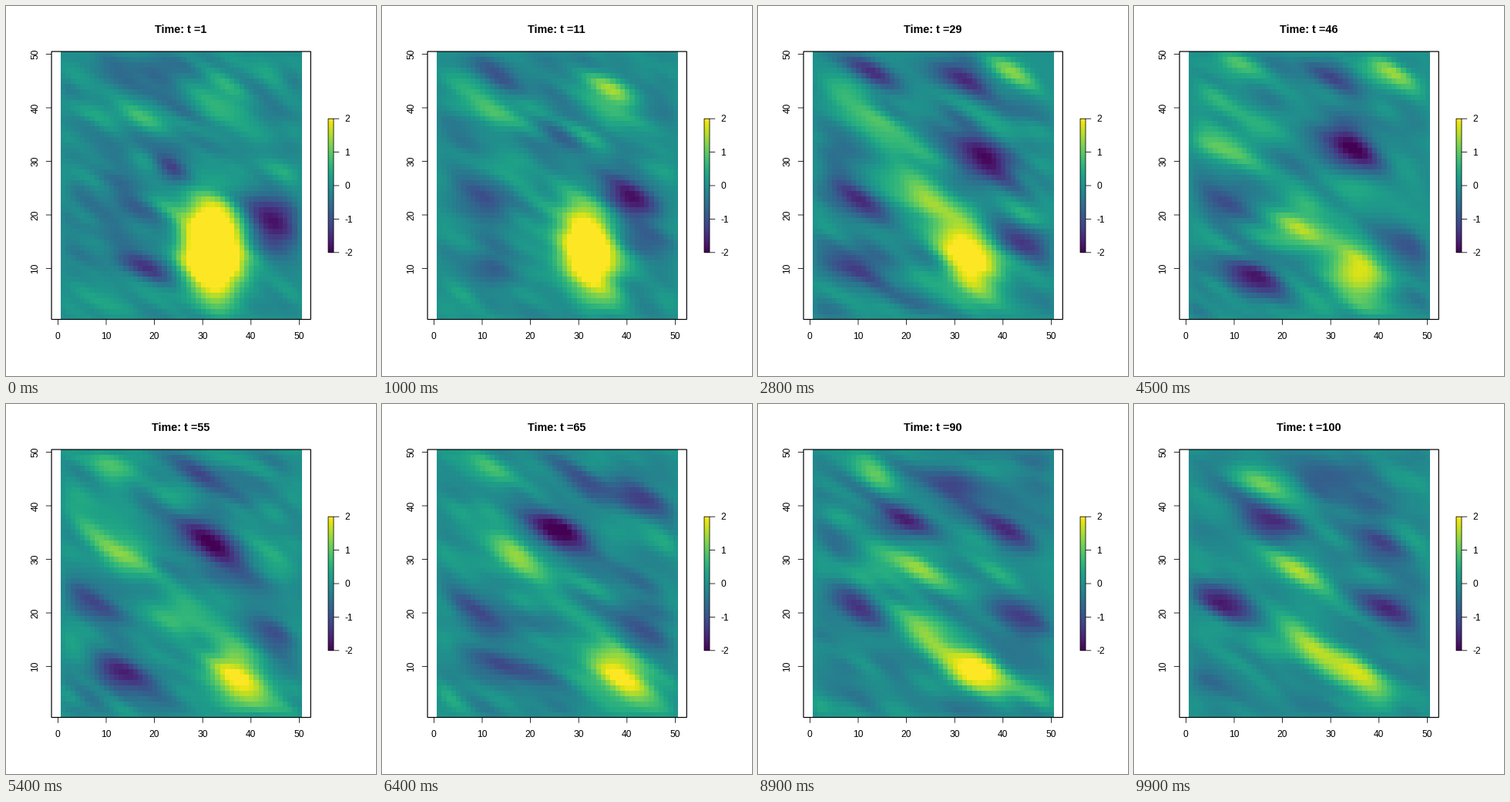
Recreate the animation shown at these times as a matplotlib script. Size 480x480 px, loop 10000 ms.

```python
import numpy as np
import matplotlib.pyplot as plt
from matplotlib.animation import FuncAnimation
from matplotlib.patches import Rectangle

SIZE, DPI, STEPS, CELLS = 480, 72, 100, 50
LEFT, RIGHT, TOP, BOTTOM = 59.04, 395.3, 59.04, 406.56
BAR = (418, 425, 146.2, 319.8)
FADE = 14            # steps a blob takes to appear or vanish
MEMORY = 0.9         # how much of the ripple stays from step to step
RIPPLE = 0.22

plt.rcParams["font.family"] = "Liberation Sans"
X, Y = np.meshgrid(np.arange(1, CELLS + 1), np.arange(1, CELLS + 1))


def gauss(x, y, long, short, tilt):
    c, s = np.cos(np.radians(tilt)), np.sin(np.radians(tilt))
    along = ((X - x) * c + (Y - y) * s) / long
    across = ((Y - y) * c - (X - x) * s) / short
    return np.exp(-(along ** 2 + across ** 2) / 2)


def edge(v, soft):
    return np.tanh(v / soft) * np.tanh((CELLS + 1 - v) / soft)


TAPER = edge(X, 2.2) * edge(Y, 1.3)


class Blob:
    """A drifting hill or hollow through key points (time, x, y, height).

    short and tilt run from their first to their second value over the loop.
    """

    def __init__(self, *keys, long=5, short=(1.8, 1.8), tilt=(-26, -26)):
        self.t, *self.path = np.array(keys, dtype=float).T
        self.long, self.short, self.tilt = long, short, tilt

    def at(self, t):
        x, y, h = (np.interp(t, self.t, p) for p in self.path)
        away = max(self.t[0] - t, t - self.t[-1], 0)
        short, tilt = (np.interp(t, (1, STEPS), p)
                       for p in (self.short, self.tilt))
        return h * max(1 - away / FADE, 0) * gauss(x, y, self.long, short, tilt)


warm = [
    Blob((1, 32, 14, 4.4), (20, 31.5, 14, 2.4), (29, 32.5, 12, 2.2),
         (46, 35, 9.3, 1.9), (65, 38.5, 8, 2), (79, 34, 9, 2.6),
         (100, 35.5, 8.6, 1.5), long=5.8, short=(4.3, 2.5), tilt=(-77, -25)),
    Blob((20, 26, 21.5, .9), (29, 23, 25, 1.2), (46, 22.5, 17, 1.1),
         (65, 23, 22, .7), (100, 25, 14.5, 1.2), short=(2.6, 2.2)),
    Blob((46, 7.3, 32.5, 1.3), (65, 18, 30, 1.3), (100, 22.5, 28, 1.6), long=6),
    Blob((1, 33, 42, .8), (20, 42.5, 45.3, 1.2), (46, 42, 47, 1.3)),
    Blob((20, 36, 39, 1.3), long=6),
    Blob((1, 17, 38, 1.2), (20, 10, 40, 1), (46, 10, 39, .8)),
    Blob((46, 10, 48, .9), (100, 15, 45, .9)),
]
cold = [
    Blob((1, 43.5, 19, -2), (29, 36, 30, -1.7), (46, 35.5, 32.3, -1.8),
         (65, 26, 35, -2.1), (79, 22, 37.5, -1.1), (100, 17, 37.2, -1.9),
         short=(2.7, 2)),
    Blob((1, 23.5, 28.8, -1.5), long=3),
    Blob((1, 18, 10, -1), (20, 6, 11, -1), (46, 12.8, 8.7, -1.8),
         (79, 13, 11.5, -1.2)),
    Blob((1, 14, 22, -.7), (20, 9, 24, -1.3), (65, 11, 19.5, -.8),
         (100, 7, 22.5, -1.4), short=(2.2, 2.4)),
    Blob((29, 31, 45.7, -1.4), (100, 29, 45.3, -.9)),
    Blob((20, 39.5, 17, -1.4), (46, 45, 15.5, -.9), (100, 42, 21, -1.1)),
    Blob((65, 43, 41, -1.2), (100, 40.5, 33, -1.2)),
    Blob((1, 13, 47.5, -.8), (29, 13, 47, -.9)),
]


def ripples():
    """Slowly renewed streaks: smoothed noise that remembers its past."""
    rng = np.random.default_rng(4)
    kernel = np.fft.fft2(gauss(25, 25, 3.5, 1.1, -26))
    z = np.zeros((STEPS, CELLS, CELLS))
    state = 0
    for i in range(STEPS):
        noise = np.fft.ifft2(kernel * np.fft.fft2(rng.normal(size=X.shape))).real
        kick = noise / noise.std()
        state = MEMORY * state + np.sqrt(1 - MEMORY ** 2) * kick if i else kick
        z[i] = state
    return RIPPLE * z


texture = ripples()


def field(i):
    z = sum(blob.at(i + 1) for blob in warm + cold)
    return (z + texture[i] - 0.08) * TAPER


fig = plt.figure(figsize=(SIZE / DPI, SIZE / DPI), dpi=DPI, facecolor="white")
ax = fig.add_axes([0, 0, 1, 1])


def line(xs, ys):
    ax.plot(xs, ys, color="black", lw=0.8, solid_capstyle="butt",
            snap=False, zorder=4)


def label(x, y, text, **kw):
    return ax.text(x, y, text, **{"size": 12, "ha": "center", "va": "baseline",
                                  "rotation_mode": "anchor", **kw})


def frame(x0, x1, y0, y1, lw):
    ax.add_patch(Rectangle((x0, y0), x1 - x0, y1 - y0, fill=False,
                           ec="black", lw=lw, snap=False, zorder=5))


def picture(data, extent):
    return ax.imshow(data, extent=extent, origin="lower", cmap="viridis",
                     vmin=-2, vmax=2, interpolation="nearest", aspect="auto")


image = picture(field(0), (70.6, 383.5, BOTTOM, TOP))
picture(np.linspace(-2, 2, 256)[:, None], (BAR[0], BAR[1], BAR[3], BAR[2]))
ax.set(xlim=(0, SIZE), ylim=(SIZE, 0))
ax.axis("off")

frame(LEFT, RIGHT, TOP, BOTTOM, 1.2)
frame(*BAR, 0.8)
for v in range(0, 51, 10):
    x, y = 67.4 + 6.26 * v, 410.03 - 6.95 * v
    line([x, x], [BOTTOM, BOTTOM + 7.2])
    label(x - 0.4, 432, str(v))
    if v:
        line([LEFT - 7.2, LEFT], [y, y])
        label(41.5, y, str(v), rotation=90)
for v in range(-2, 3):
    y = 233 - 43.4 * v
    line([BAR[1], BAR[1] + 7.2], [y, y])
    label(439, y + 4.2, str(v), ha="left")

title = label(226.6, 35, "", size=14.4, weight="bold")


def draw(i):
    image.set_data(field(i))
    title.set_text(f"Time: t ={i + 1}")
    return image, title


anim = FuncAnimation(fig, draw, frames=STEPS, interval=100, repeat=True,
                     repeat_delay=0)
plt.show()
```
